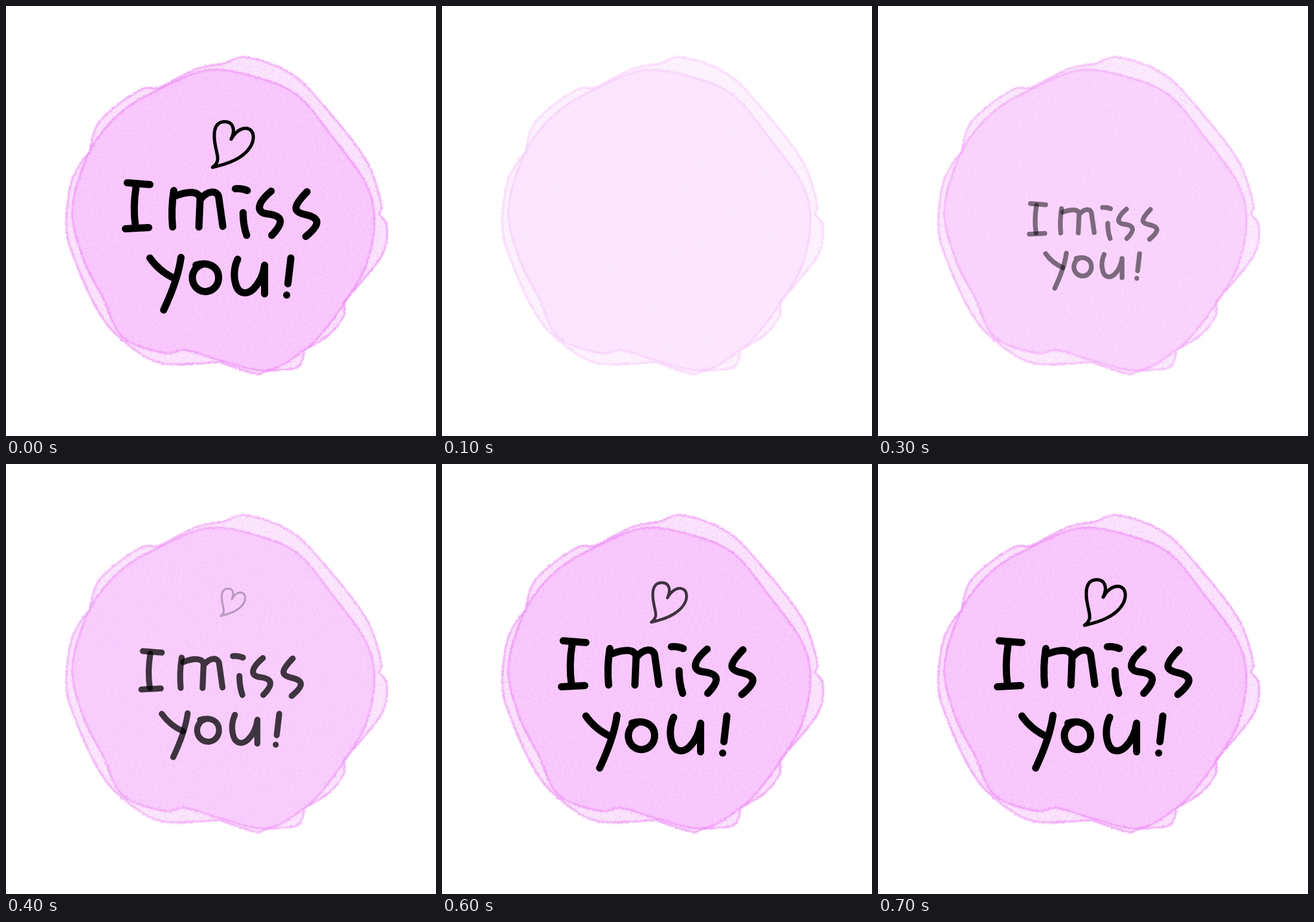
Animation of 720 by 720 pixels, one loop 1500 ms. Source, as an HTML page:

```html
<!DOCTYPE html>
<html lang="en">
<head>
<meta charset="utf-8">
<title>I miss you!</title>
<style>
  html, body { margin: 0; width: 100%; height: 100%; overflow: hidden; background: #fff; }
  svg { display: block; width: 100vw; height: 100vh; }
  .ink { fill: none; stroke: #000; stroke-width: 12; stroke-linecap: round; stroke-linejoin: round; }
  .thin { stroke-width: 5.5; }
  .edge { fill: none; stroke: #ea80f4; stroke-linejoin: round; }
</style>
</head>
<body>
<svg viewBox="0 0 720 720" role="img" aria-label="I miss you!">
  <defs>
    <filter id="paper" filterUnits="userSpaceOnUse" x="80" y="70" width="580" height="570" color-interpolation-filters="sRGB">
      <feTurbulence type="fractalNoise" baseFrequency=".22" numOctaves="2" seed="4" result="rough"/>
      <feDisplacementMap in="SourceGraphic" in2="rough" scale="4" xChannelSelector="R" yChannelSelector="G" result="shape"/>
      <feTurbulence type="fractalNoise" baseFrequency=".25" numOctaves="3" seed="9"/>
      <feColorMatrix values="0 0 0 0 .95  0 0 0 0 .6  0 0 0 0 .97  0 0 0 .5 -.2"/>
      <feComposite operator="in" in2="shape" result="grain"/>
      <feMerge><feMergeNode in="shape"/><feMergeNode in="grain"/></feMerge>
    </filter>
  </defs>
  <g id="blob"><g id="layers" filter="url(#paper)"></g></g>
  <g id="words" class="ink"></g>
  <g id="heart" class="ink thin"></g>
</svg>
<script>
const $ = id => document.getElementById(id);

function addPath(parent, attrs) {
  const path = document.createElementNS('http://www.w3.org/2000/svg', 'path');
  for (const key in attrs) path.setAttribute(key, attrs[key]);
  parent.append(path);
}

// Smooth curve through a run of points; runs meet in corners.
function outline(...runs) {
  let d = '';
  for (const run of runs) {
    const last = run.length / 2 - 1;
    const at = i => {
      const k = 2 * Math.max(0, Math.min(last, i));
      return [run[k], run[k + 1]];
    };
    d += (d ? 'L' : 'M') + at(0);
    for (let i = 0; i < last; i++) {
      const [a, b, c, e] = [at(i - 1), at(i), at(i + 1), at(i + 2)];
      const out = b.map((v, k) => v + (c[k] - a[k]) / 6);
      const into = c.map((v, k) => v - (e[k] - b[k]) / 6);
      d += `C${out} ${into} ${c}`;
    }
  }
  return d + 'Z';
}

const outer = outline(
  [255,138, 320,105, 362,97, 404,86, 480,115, 545,182, 605,262, 628,330, 624,348],
  [624,348, 638,370, 628,420, 566,495],
  [566,495, 565,520, 540,551, 500,576],
  [500,576, 488,605, 437,611, 418,616, 357,596],
  [357,596, 265,599, 208,570, 160,520, 117,430, 101,370, 111,290, 140,244],
  [140,244, 157,193, 222,142, 255,138]
);
const inner = outline(
  [568,496, 535,541, 500,576, 437,610, 357,593, 300,576, 265,581, 195,555, 163,490, 130,425, 111,340,
   140,244, 190,180, 255,140, 340,107, 425,121, 490,151, 545,217, 602,296, 617,360, 603,435, 568,496]
);

const layers = $('layers');
addPath(layers, { d: outer, fill: '#fbe6fd' });
addPath(layers, { d: inner, fill: '#f9cafd' });
for (const d of [outer, inner]) {
  addPath(layers, { d, class: 'edge', 'stroke-width': 7, 'stroke-opacity': .13 });
  addPath(layers, { d, class: 'edge', 'stroke-width': 2.6, 'stroke-opacity': .5 });
}

const letters = {
  I: ['M203 296L241 299', 'M218 301Q212 338 217 370', 'M200 373L239 371'],
  m: ['M281 309Q276 340 279 370', 'M284 318C304 310 324 309 325 323L323 370M326 323C338 309 352 308 356 319Q359 340 363 369'],
  i: ['M384 306Q395 305 404 309', 'M397 346Q397 367 403 384'],
  s1: ['M444 310C418 332 420 346 437 348C464 351 466 362 445 384'],
  s2: ['M504 311C480 336 480 344 500 349C528 355 526 366 502 386'],
  y: ['M241 422Q258 446 284 457', 'M293 421Q288 458 264 509'],
  o: ['M318 434C341 427 356 438 356 455A22 23 0 1 1 328 433'],
  u: ['M388 424C382 436 381 452 384 463C388 483 403 484 414 474Q430 458 433 434V482'],
  mark: ['M477 422L472 465', 'M470 484h.01']
};
for (const d of Object.values(letters).flat()) addPath($('words'), { d });
addPath($('heart'), {
  d: 'M346 270C359 260 354 252 351 236C346 212 349 196 363 194C380 192 385 206 377 223' +
     'C384 211 394 203 404 205C417 208 416 225 409 236C397 255 373 264 346 270'
});

const STEP = 100, LOOP = 1500, BLOB_END = 5, WORDS_END = 5, HEART_END = 7;

// Grows and fades in over four steps; opacity per stroke makes crossings darker.
function pop(group, cx, cy, left, shrink) {
  const scale = 1 - left * shrink;
  group.setAttribute('transform', `translate(${cx} ${cy}) scale(${scale}) translate(${-cx} ${-cy})`);
  group.setAttribute('stroke-opacity', Math.max(0, 1 - left / 4));
}

function draw(time) {
  // The loop opens on the finished picture.
  const step = Math.floor(time % LOOP / STEP) || HEART_END;
  const left = end => Math.max(0, end - step);
  $('blob').setAttribute('opacity', Math.sqrt(1 - left(BLOB_END) / BLOB_END));
  pop($('words'), 360, 400, left(WORDS_END), 1 / 6);
  pop($('heart'), 380, 231, left(HEART_END), 2 / 15);
}

const start = performance.now();
function tick() {
  draw(performance.now() - start);
  requestAnimationFrame(tick);
}
tick();
</script>
</body>
</html>
```
